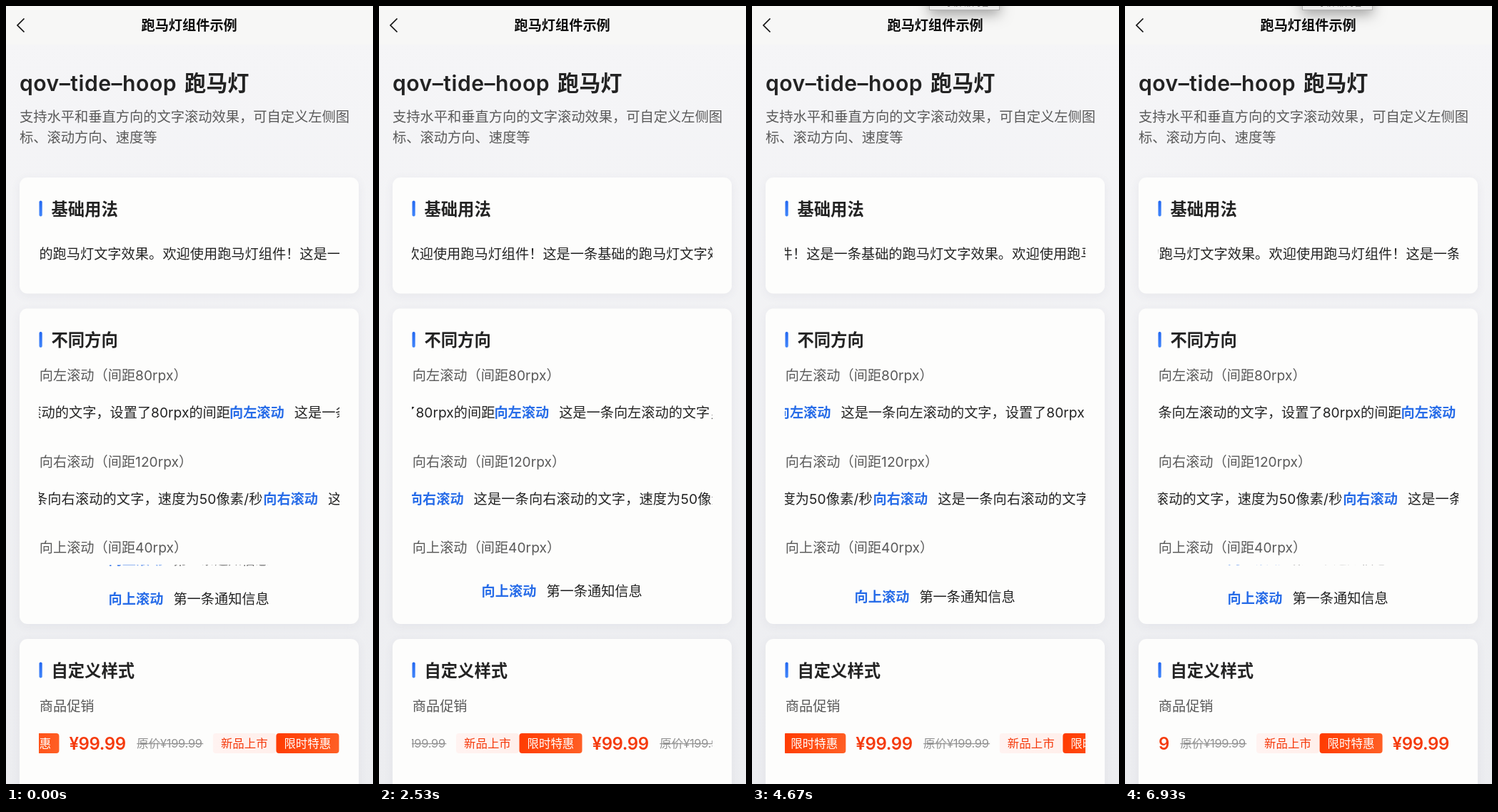
Animation of 514 by 1089 pixels, one loop 6.99 s. Source, as an HTML page with a canvas:

```html
<!DOCTYPE html>
<html lang="zh-CN">
<head>
<meta charset="utf-8">
<title>跑马灯组件示例</title>
<style>
  html, body { margin: 0; width: 100%; height: 100%; overflow: hidden; background: #f0f1f3; }
  canvas { display: block; width: 514px; height: 1089px; }
</style>
</head>
<body>
<canvas id="stage"></canvas>
<script>
const W = 514, H = 1089, LOOP = 6990, STEP = 1000 / 15;
const FONT = 'Inter, "Noto Sans CJK SC", "Noto Sans CJK", sans-serif';
const INK = '#232323', SOFT = '#595959', BLUE = '#276ce8', RED = '#f53a0c';
const BODY = 19.2, TAG = 16.45;
const LEFT = 46, RIGHT = 467;

const canvas = document.getElementById('stage');
const ctx = canvas.getContext('2d');
const dpr = window.devicePixelRatio || 1;
canvas.width = W * dpr;
canvas.height = H * dpr;

// Text placed by its left edge and the vertical middle of its glyphs.
function text(str, x, mid, size, color, weight = 400, spacing = 0) {
  ctx.font = `${weight} ${size}px ${FONT}`;
  ctx.letterSpacing = spacing + 'px';
  ctx.fillStyle = color;
  ctx.fillText(str, x, mid + size * 0.375);
  return ctx.measureText(str).width;
}

function box(x, y, w, h, r, fill) {
  ctx.fillStyle = fill;
  ctx.beginPath();
  ctx.roundRect(x, y, w, h, r);
  ctx.fill();
}

function fade(x0, y0, x1, y1, from, to) {
  const g = ctx.createLinearGradient(x0, y0, x1, y1);
  g.addColorStop(0, from);
  g.addColorStop(1, to);
  return g;
}

function shadowed(color, blur, dy, draw) {
  ctx.save();
  ctx.shadowColor = color;
  ctx.shadowBlur = blur * dpr;
  ctx.shadowOffsetY = dy * dpr;
  draw();
  ctx.restore();
}

function clipped(y, h, draw) {
  ctx.save();
  ctx.beginPath();
  ctx.rect(LEFT, y, RIGHT - LEFT, h);
  ctx.clip();
  draw();
  ctx.restore();
}

const wrap = (v, n) => ((v % n) + n) % n;

// Repeats an item of the given period across the visible strip.
function marquee(mid, shift, period, draw) {
  clipped(mid - 20, 40, () => {
    for (let x = wrap(shift, period) - period; x < RIGHT; x += period) draw(x);
  });
}

function notice(label, str, x, mid, spacing = 0) {
  text(label, x, mid, BODY, BLUE, 600);
  text(str, x + 90.8, mid, BODY, INK, 400, spacing);
}

function card(y, h, title) {
  shadowed('rgba(70, 76, 120, 0.07)', 14, 3, () => box(19, y, 475, h, 11, '#fdfdfc'));
  box(46.5, y + 32.5, 4.2, 22, 2, fade(0, y + 32, 0, y + 55, '#2468f0', '#4387fb'));
  text(title, 63.5, y + 44, 23.3, INK, 600);
}

function header() {
  ctx.fillStyle = fade(0, 54, 0, H, '#f5f5f7', '#ecedf0');
  ctx.fillRect(0, 0, W, H);
  ctx.fillStyle = '#f7f7f6';
  ctx.fillRect(0, 0, W, 54);
  ctx.strokeStyle = '#111';
  ctx.lineWidth = 1.7;
  ctx.beginPath();
  ctx.moveTo(25.5, 17.5);
  ctx.lineTo(16, 27);
  ctx.lineTo(25.5, 36.5);
  ctx.stroke();
  text('跑马灯组件示例', 189.5, 27, BODY, '#0c0c0c', 600);
  text('qov–tide–hoop', 19, 108, 30.15, INK, 600, 0.5);
  text('跑马灯', 250, 108, 30.15, INK, 600);
  text('支持水平和垂直方向的文字滚动效果，可自定义左侧图', 19, 155, 19.25, SOFT);
  text('标、滚动方向、速度等', 19, 184, 19.25, SOFT);
}

function promo(x) {
  const mid = 1032, top = 1018, w = 88, h = 28;
  box(x, top, w, h, 4, fade(x, top, x + w, top + h, '#ff3a00', '#ff6026'));
  text('限时特惠', x + 11, mid, TAG, '#fff');
  text('¥99.99', x + 102, mid, 24, RED, 600, -0.4);
  const old = x + 196.8;
  const cjk = text('原价', old, mid, TAG, '#929292');
  text('¥199.99', old + cjk, mid, TAG, '#929292', 400, -0.3);
  ctx.fillRect(old, mid, 93, 1.2);
  box(x + 303.5, top, w, h, 4, fade(x + 303, 0, x + 391, 0, '#fff3f1', '#ffefeb'));
  text('新品上市', x + 314.5, mid, TAG, RED);
}

function popup() {
  shadowed('rgba(0, 0, 0, 0.34)', 18, 6, () => box(248, -30, 99, 36, 1, '#ececec'));
  ctx.strokeStyle = '#b4b4b4';
  ctx.lineWidth = 1;
  ctx.strokeRect(248.5, -30, 98, 35.5);
  text('显示屏幕内容', 258, -5, 12.5, '#777');
}

function render(ms) {
  const frame = Math.floor((ms % LOOP + 3.4) / STEP);
  const t = frame * STEP / 1000;
  const fast = 71.8 * t, slow = 59.85 * t, rise = 47.6 * t;

  ctx.setTransform(dpr, 0, 0, dpr, 0, 0);
  header();

  card(240, 162.5, '基础用法');
  marquee(347, 219.4 - fast, 25 * BODY, x =>
    text('欢迎使用跑马灯组件！这是一条基础的跑马灯文字效果。', x, 347, BODY, INK));

  card(423.5, 441.5, '不同方向');
  text('向左滚动（间距80rpx）', 46.8, 517, BODY, SOFT);
  marquee(569, 313 - slow, 488.5, x =>
    notice('向左滚动', '这是一条向左滚动的文字，设置了80rpx的间距', x, 569));
  text('向右滚动（间距120rpx）', 46.8, 638, BODY, SOFT);
  marquee(690, 360.2 + slow, 470, x =>
    notice('向右滚动', '这是一条向右滚动的文字，速度为50像素/秒', x, 690, 0.13));
  text('向上滚动（间距40rpx）', 46.8, 758, BODY, SOFT);
  const top = 782.5, line = 54.8;
  clipped(top, line + 1.5, () => {
    for (let i = -1; i < 2; i++) {
      const y = top + wrap(829.8 - top - rise, line) + i * line;
      notice('向上滚动', '第一条通知信息', 143.6, y);
    }
  });

  card(886, 230, '自定义样式');
  text('商品促销', 46.8, 980, BODY, SOFT);
  marquee(1032, 378.4 - fast, 392, promo);

  if (t >= 4) popup();
}

function tick() {
  render(performance.now());
  requestAnimationFrame(tick);
}
tick();
</script>
</body>
</html>
```
